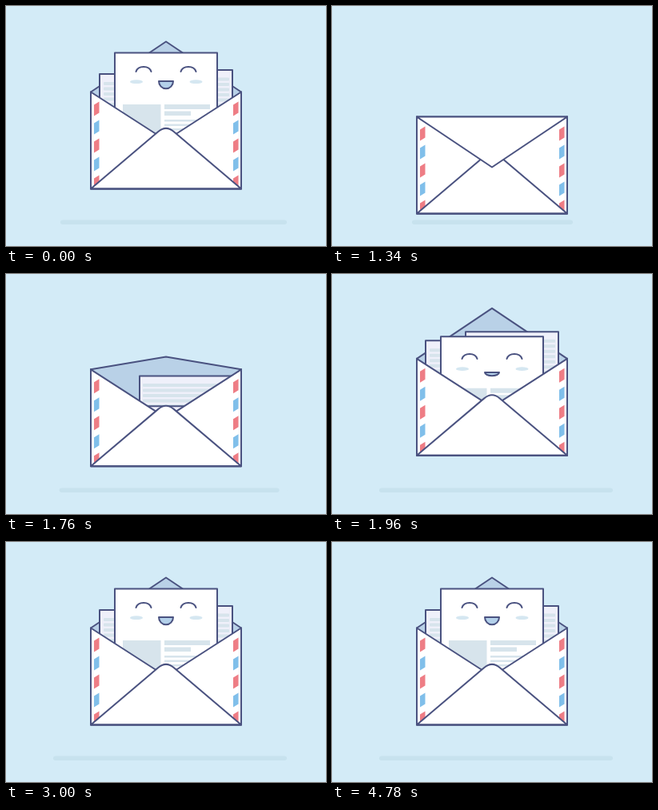
Write an HTML page that moves like this. It is 400 px wide and 300 px high and loops after 4.8 s.

```html
<!DOCTYPE html>
<html lang="en">
<head>
<meta charset="utf-8">
<title>Happy letter</title>
<style>
  html, body { margin: 0; width: 100%; height: 100%; overflow: hidden; background: #d3ebf7; }
  svg { display: block; width: 100vw; height: 100vh; }
  .line { stroke: #4a5280; stroke-width: 2; stroke-linejoin: round; stroke-linecap: round; }
  .white { fill: #fff; }
  .inside { fill: #b9d1e7; }
  .back { fill: #eff0fa; }
  .ink { fill: #d7e4ec; }
  .none { fill: none; }
</style>
</head>
<body>
<svg viewBox="0 0 400 300">
  <defs>
    <clipPath id="pocket"><rect x="100" y="-40" width="200" height="267"/></clipPath>
  </defs>
  <rect id="shadow" y="267.5" height="5.5" rx="2.7" fill="#c7e2ee"/>
  <g id="confetti"></g>
  <g id="envelope">
    <path id="backFlap" class="line inside"/>
    <g id="letters" clip-path="url(#pocket)">
      <g id="rightLetter"><rect class="line back" x="167" y="80" width="116" height="120"/></g>
      <g id="leftLetter"><rect class="line back" x="117" y="85" width="116" height="120"/></g>
      <g id="mainLetter">
        <rect class="line white" x="136" y="58.5" width="128" height="130"/>
        <g class="ink">
          <rect x="146" y="123" width="47.5" height="36"/>
          <rect x="198" y="123" width="57" height="6"/>
          <rect x="198" y="131.5" width="33" height="5.5"/>
          <rect x="198" y="142" width="44" height="2.5"/>
          <rect x="198" y="147.5" width="40" height="2.5"/>
          <rect x="198" y="153" width="32" height="2.5"/>
        </g>
        <g id="face">
          <ellipse cx="163" cy="94.7" rx="8" ry="2.4" fill="#d5e7f1"/>
          <ellipse cx="237.5" cy="94.7" rx="8" ry="2.4" fill="#d5e7f1"/>
          <path class="line none" d="M162.5 82C165 74 179 74 181.5 82M218.5 82C221 74 235 74 237.5 82"/>
          <path id="mouth" class="line" fill="#b3d0ea"/>
        </g>
      </g>
    </g>
    <path class="white" d="M106 107.5L200 168L294 107.5V228.5H106Z"/>
    <path class="line none" d="M106 107.5L200 168L294 107.5"/>
    <g id="stripes"></g>
    <path class="line white" d="M106 228.5L190 157.3Q200 148.5 210 157.3L294 228.5Z"/>
    <path class="line none" d="M106 107.5V228.5H294V107.5"/>
    <path id="frontFlap" class="line white"/>
  </g>
</svg>
<script>
const LOOP = 4800;
const $ = id => document.getElementById(id);

function add(parent, tag, attrs) {
  const node = document.createElementNS('http://www.w3.org/2000/svg', tag);
  for (const key in attrs) node.setAttribute(key, attrs[key]);
  return parent.appendChild(node);
}

const ease = {
  in: p => p * p,
  out: p => 1 - (1 - p) * (1 - p),
  both: p => p * p * (3 - 2 * p),
  linear: p => p
};

// Each step is [time, value, easing towards that value].
const tracks = {
  drop: [[0, 0], [1060, 0], [1290, 31, 'in'], [1580, 31], [1760, 12, 'both'], [1920, -2, 'out'], [2080, 0, 'both']],
  flap: [[0, 1], [1100, 1], [1280, -1, 'both'], [1560, -1], [1760, .24, 'both'], [1900, 1, 'out']],
  right: [[0, 0], [1000, 0], [1180, 80, 'in'], [1640, 80], [1760, 36, 'linear'], [1960, -6, 'out'], [2220, -3.5, 'both'], [2460, 0, 'both']],
  left: [[0, 0], [1000, 0], [1180, 80, 'in'], [1740, 80], [2040, -6, 'out'], [2220, -3.5, 'both'], [2460, 0, 'both']],
  main: [[0, 0], [1000, 0], [1200, 105, 'in'], [1800, 105], [2120, -6, 'out'], [2220, -3.5, 'both'], [2460, 0, 'both'],
    [4000, 0], [4120, 2, 'both'], [4250, 0, 'both'], [4380, 2, 'both'], [4520, 0, 'both'], [4640, .6, 'both'], [4780, 0, 'both']],
  face: [[0, 0], [1700, 6], [2220, 2.5, 'both'], [2600, 0, 'both']],
  smile: [[0, 0], [1700, 1], [2240, 1], [2700, 0, 'both']],
  shadowLeft: [[0, 68], [1060, 68], [1290, 100, 'in'], [1580, 100], [1900, 59, 'out']],
  shadowRight: [[0, 351], [1060, 351], [1290, 301, 'in'], [1580, 301], [1900, 351, 'out']]
};

function valueAt(steps, t) {
  const i = steps.findIndex(step => step[0] > t);
  if (i < 0) return steps[steps.length - 1][1];
  const [t0, from] = steps[i - 1];
  const [t1, to, kind = 'linear'] = steps[i];
  return from + (to - from) * ease[kind]((t - t0) / (t1 - t0));
}

for (let i = 0; i < 5; i++) {
  for (const x of [110, 284]) {
    add($('stripes'), 'path', {
      d: `M${x} ${123.5 + i * 23}l6.5 -4v14l-6.5 4z`,
      fill: i % 2 ? '#80bfea' : '#ee7d85'
    });
  }
}

function addLines(letter, x, y, width, count) {
  for (let i = 0; i < count; i++) {
    add($(letter), 'rect', { class: 'ink', x, y: y + i * 6.5, width, height: 4, rx: 1 });
  }
}
addLines('rightLetter', 171, 89.5, 108, 9);
addLines('leftLetter', 122, 95, 106, 9);

// Offsets are measured outwards from the middle of the stage.
const bits = [];
for (const side of [-1, 1]) {
  for (const [reach, y, width, height, fill] of [
    [133, 97, 6, 2.6, '#78b8e8'],
    [120.5, 85, 2.6, 2.4, '#78a9cb'],
    [128.5, 113, 3, 2.6, '#70afdf']
  ]) {
    const node = add($('confetti'), 'rect', { x: -width / 2, y: -height / 2, width, height, rx: 1, fill });
    bits.push({ node, side, reach, y });
  }
}

const shift = (id, y) => $(id).setAttribute('transform', `translate(0 ${y})`);

function drawConfetti(t) {
  const p = (t - 1980) / 360;
  $('confetti').style.display = p > 0 && p < 1 ? '' : 'none';
  if (p <= 0 || p >= 1) return;
  const travel = ease.out(p) / ease.out(2 / 3);
  const scale = Math.min(1, (1 - p) * 3);
  for (const { node, side, reach, y } of bits) {
    const x = 200 + side * (98 + (reach - 98) * travel);
    const top = 104 + (y - 104) * travel;
    node.setAttribute('transform', `translate(${x} ${top}) rotate(${-side * 16}) scale(${scale})`);
  }
}

function draw(t) {
  const pose = {};
  for (const name in tracks) pose[name] = valueAt(tracks[name], t);

  shift('envelope', pose.drop);
  shift('rightLetter', pose.right);
  shift('leftLetter', pose.left);
  shift('mainLetter', pose.main);
  shift('face', pose.face);

  const tip = 107.5 - 63 * pose.flap;
  $('backFlap').setAttribute('d', `M106 228.5V107.5L200 ${Math.min(tip, 107.5)}L294 107.5V228.5Z`);
  $('frontFlap').setAttribute('d', `M106 107.5H294L200 ${tip}Z`);
  $('frontFlap').style.display = pose.flap < 0 ? '' : 'none';

  const lip = 94 + 5 * pose.smile;
  $('mouth').setAttribute('d', `M191 ${lip}H209A9 ${9.3 - 5 * pose.smile} 0 0 1 191 ${lip}Z`);

  $('shadow').setAttribute('x', pose.shadowLeft);
  $('shadow').setAttribute('width', pose.shadowRight - pose.shadowLeft);
  drawConfetti(t);
}

const start = performance.now();
function tick() {
  draw((performance.now() - start) % LOOP);
  requestAnimationFrame(tick);
}
tick();
</script>
</body>
</html>
```
